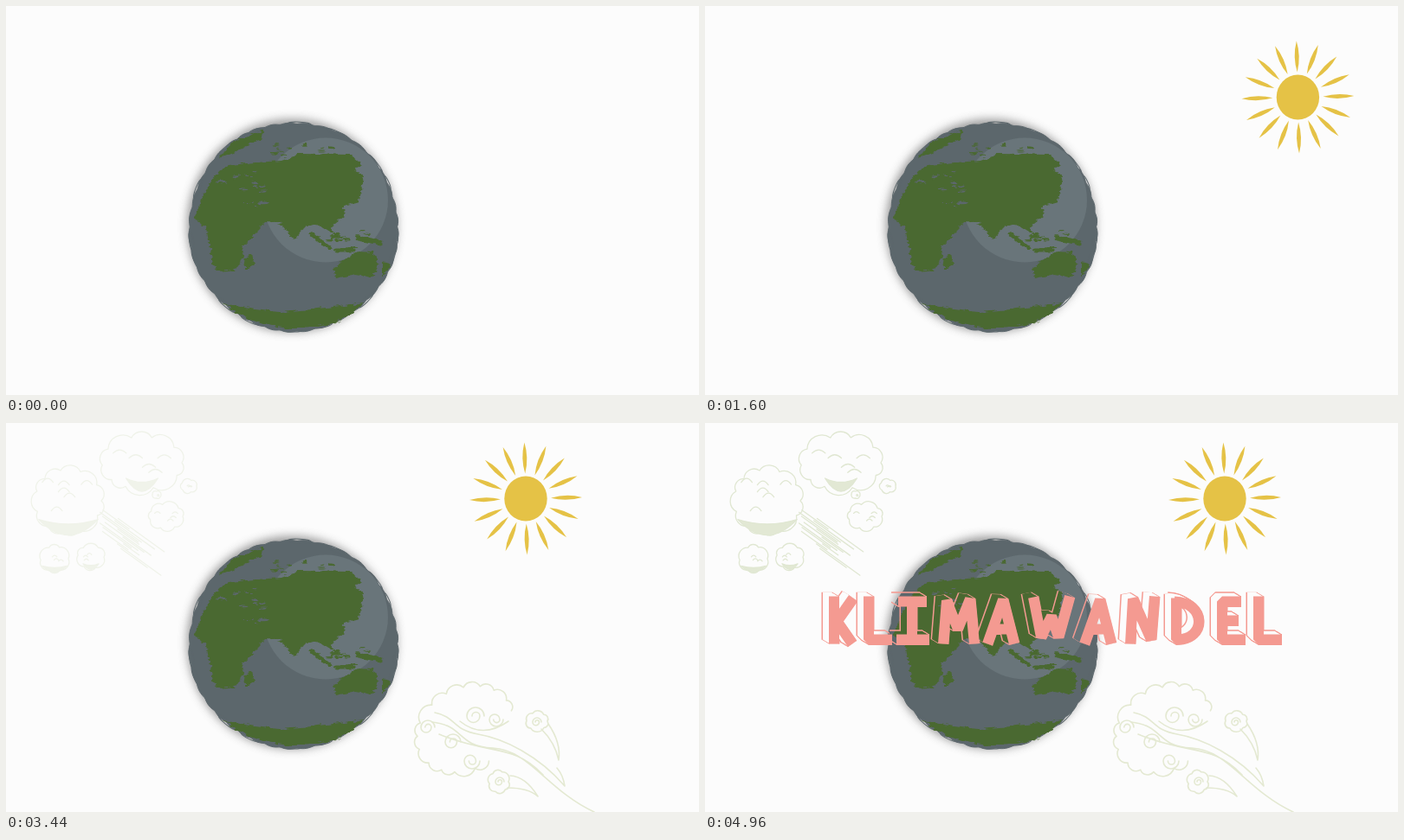
Animation of 800x450 px, one loop 6000 ms. Source, as an HTML page:

```html
<!DOCTYPE html>
<html lang="de">
<head>
<meta charset="utf-8">
<title>Klimawandel</title>
<style>
  html, body { margin: 0; height: 100%; overflow: hidden; background: #fcfcfc; }
  svg { display: block; width: 100vw; height: 100vh; }
</style>
</head>
<body>
<svg viewBox="0 0 800 450" fill="none" stroke-linecap="round" stroke-linejoin="round">
  <defs>
    <filter id="rough" color-interpolation-filters="sRGB">
      <feTurbulence type="fractalNoise" baseFrequency=".09 .28" numOctaves="2" seed="4"/>
      <feDisplacementMap in="SourceGraphic" scale="7" xChannelSelector="R" yChannelSelector="G"/>
    </filter>
    <filter id="blur" x="-20%" y="-20%" width="140%" height="140%"><feGaussianBlur stdDeviation="5.5"/></filter>
    <mask id="edges" maskUnits="userSpaceOnUse" x="0" y="0" width="800" height="450"></mask>
    <g id="faces" stroke-linecap="butt" stroke-linejoin="bevel"></g>
  </defs>

  <ellipse cx="330" cy="254" rx="121" ry="123" fill="#555" opacity=".6" filter="url(#blur)"/>
  <g id="rim" stroke="#5c676c"></g>
  <circle cx="369" cy="224.500" r="72" fill="#69757a"/>
  <g id="land" fill="#4a6931" stroke="#4a6931" filter="url(#rough)">
    <g stroke="none">
      <path d="M217 246L228 218 243 194 258 184 288 181 318 179 340 171 398 172 411 184 404 190 413 196 408 226 390 231 391 243 375 256 379 265 358 252 345 256 333 270 317 252 303 248 288 263 272 281 274 290 264 306 248 308 240 302 231 257Z"/>
      <path d="M246 176L262 157 299 143 294 154 266 168Z"/>
      <path d="M276 291L284 287 286 298 281 303 274 303Z"/>
      <path d="M378 303L405 284 424 285 431 300 420 315 404 310 381 315ZM434 296L444 299 434 313Z"/>
      <path d="M252 344Q285 352 317 354 370 350 413 343 390 373 332 373 280 370 252 344Z"/>
    </g>
    <path stroke-width="5" d="M352 263L373 280M381 282H400M378 268H386M406 269L432 274"/>
  </g>

  <g id="sun" fill="#e5c246"><ellipse rx="24.700" ry="26"/></g>
  <g id="wind" stroke="#e4e9d2" stroke-width="1.600">
    <path d="M495 335C520 340 515 355 545 360S615 385 645 420M492 346C530 350 520 374 562 376S625 425 679 450M500 360C560 385 585 370 620 407M524 345Q550 366 580 345M645 420Q643 407 636 399"/>
    <path d="M618 354Q634 370 638 390 641 370 626 348M582 408Q600 409 614 432 603 422 579 422"/>
  </g>
  <g id="clouds" stroke="#e0e7d2" stroke-width="1.300"></g>

  <g id="title" role="img" aria-label="KLIMAWANDEL" stroke="#f49a91" stroke-width="12">
    <use href="#faces"/>
    <rect width="800" height="450" fill="#f49a91" stroke="none" mask="url(#edges)"/>
  </g>
</svg>
<script>
const $ = id => document.getElementById(id);
const add = (id, markup) => $(id).insertAdjacentHTML('beforeend', markup);
const line = (id, d, attrs = '') => add(id, `<path d="${d}" ${attrs}/>`);
const TAU = Math.PI * 2;
let seed = 7;
const rnd = (lo, hi) => {
  seed = seed * 16807 % 2147483647;
  return lo + (hi - lo) * seed / 2147483647;
};

// Scalloped ellipse, or part of one
function ring(id, cx, cy, rx, ry, n, tilt = 0, from = 0, to = TAU) {
  const c = Math.cos(tilt), s = Math.sin(tilt);
  let d = '', first, px, py;
  for (let i = 0; i <= n; i++) {
    const a = from + (to - from) * (i + (i % n ? rnd(-.2, .2) : 0)) / n;
    const u = rx * Math.cos(a), v = ry * Math.sin(a);
    const x = cx + u * c - v * s, y = cy + u * s + v * c;
    const r = .57 * Math.hypot(x - px, y - py);
    d += i ? `A${r} ${r} 0 0 1 ${x} ${y}` : `M${x} ${y}`;
    [px, py] = [x, y];
  }
  line(id, d);
}

// Inward spiral made of shrinking half circles
const curl = (x, y, r, sweep = 0) => line('wind', `M${x + r} ${y}` +
  [[1, -2], [.75, 1.5], [.45, -.9]].map(([k, dx]) => `a${r * k} ${r * k} 0 0 ${sweep} ${r * dx} 0`).join(''));

function specks(cx, cy, w, h, n, color) {
  for (let i = 0; i < n; i++)
    add('land', `<ellipse cx="${cx + rnd(-w, w)}" cy="${cy + rnd(-h, h)}" rx="${rnd(2, 6)}" ry="${rnd(.5, 1.5)}" fill="${color}" stroke="none"/>`);
}

// Globe body with an uneven, scribbled rim
let body = '';
for (let i = 0; i < 360; i++) {
  const a = i * TAU / 360, r = 119.7 + 1.4 * Math.abs(Math.sin(a * 19 + Math.sin(a * 3))) + .8 * Math.sin(a * 5);
  body += `${i ? 'L' : 'M'}${332 + r * Math.cos(a)} ${255.5 + r * Math.sin(a)}`;
}
line('rim', body + 'Z', 'fill="#5c676c"');
for (let i = 0; i < 16; i++)
  add('rim', `<ellipse cx="119" rx="2.500" ry="${rnd(6, 14)}" transform="translate(332 255.500) rotate(${i * 22.5 + rnd(-9, 9)})"/>`);

specks(385, 270, 32, 12, 16, '#4a6931');
specks(345, 167, 40, 6, 12, '#4a6931');
specks(270, 212, 35, 22, 12, '#5c676c');

for (let i = 0; i < 16; i++)
  add('sun', `<path d="M29 0Q47-5 65 0 47 5 29 0" transform="rotate(${i * 22.5 - 1.4})"/>`);

// Wind-blown swirl
ring('wind', 530, 354, 58, 46, 14, -.55, 1.5, 6.5);
ring('wind', 613, 345, 12, 10, 6);
ring('wind', 569, 415, 11, 12, 6);
curl(487, 352, 8);
curl(542, 339, 10);
curl(566, 343, 8, 1);
curl(516, 369, 9);
curl(538, 391, 9, 1);
curl(613, 346, 5);
curl(570, 415, 5);

// Storm clouds: outline, inner folds and a shaded crescent
function cloud(cx, cy, rx, ry, n, shaded) {
  ring('clouds', cx, cy, rx, ry, n);
  for (let i = 0; i < n / 2; i++)
    line('clouds', `M${cx + rnd(-.8, .4) * rx} ${cy + rnd(-.6, .4) * ry}q${rx / 6}-${ry / 4} ${rx / 3} 0`);
  if (shaded)
    line('clouds', `M${cx - rx * shaded} ${cy + ry * .6}q${rx * shaded} ${ry} ${rx * shaded * 2} 0q${-rx * shaded} ${ry * .3} ${-rx * shaded * 2} 0`, 'fill="#e2e8d4"');
}
cloud(157, 46, 46, 30, 10, .4);
cloud(72, 90, 38, 36, 11, .9);
cloud(174, 83, 5, 4, 4);
cloud(211, 73, 9, 7, 5);
cloud(185, 108, 19, 14, 7);
cloud(56, 157, 16, 14, 6, .9);
cloud(98, 155, 15, 13, 6, .6);
for (let i = 0; i < 14; i++) {
  const x = rnd(108, 138), y = 128 - (i * 2.5) + (x - 108) * .7, len = rnd(18, 55);
  line('clouds', `M${x} ${y}l${len} ${len * .72}`);
}

// Block lettering: solid faces plus the outline of the swept depth
const glyphs = {
  K: 'M6 0V55M28 2L9 29 27 55',
  L: 'M6 0V50H33',
  I: 'M3 6H36M19 6V50M1 50H39',
  M: 'M5 55L9 5 22 38 36 3 41 55',
  A: 'M4 55L22 4 35 55M12 38H30',
  W: 'M4 1L13 47 25 23 33 47 46 0',
  N: 'M5 55L8 3 29 50 33 0',
  D: 'M8 2V50C44 50 42 7 6 6',
  E: 'M28 6H6V50H33M6 28H25'
};
const left = [143, 183, 220, 270, 322, 375, 434, 486, 536, 591, 633];
[...'KLIMAWANDEL'].forEach((ch, i) => line('faces', glyphs[ch], `transform="translate(${left[i]} 200.500)"`));
const sweep = (color, width) => {
  for (let i = 0; i <= 8; i++)
    add('edges', `<use href="#faces" x="${-i}" y="${-i * .6}" stroke="${color}" stroke-width="${width}"/>`);
};
sweep('#fff', 13);
sweep('#000', 10);

const clamp = v => Math.min(1, Math.max(0, v));
const fade = (id, t, start) => $(id).setAttribute('opacity', clamp((t - start) / 1000));

function draw(now) {
  const t = Math.floor(now % 6000 / 40) * 40;
  const left = Math.max(0, 2000 - t);
  const x = 600 + .211 * left, y = 87.5 + .044 * left + 2.6 * Math.sin(left / 135);
  $('sun').setAttribute('transform', `translate(${x} ${y})`);
  fade('wind', t, 2000);
  fade('clouds', t, 3000);
  fade('title', t, 3960);
  requestAnimationFrame(draw);
}
draw(0);
</script>
</body>
</html>
```
